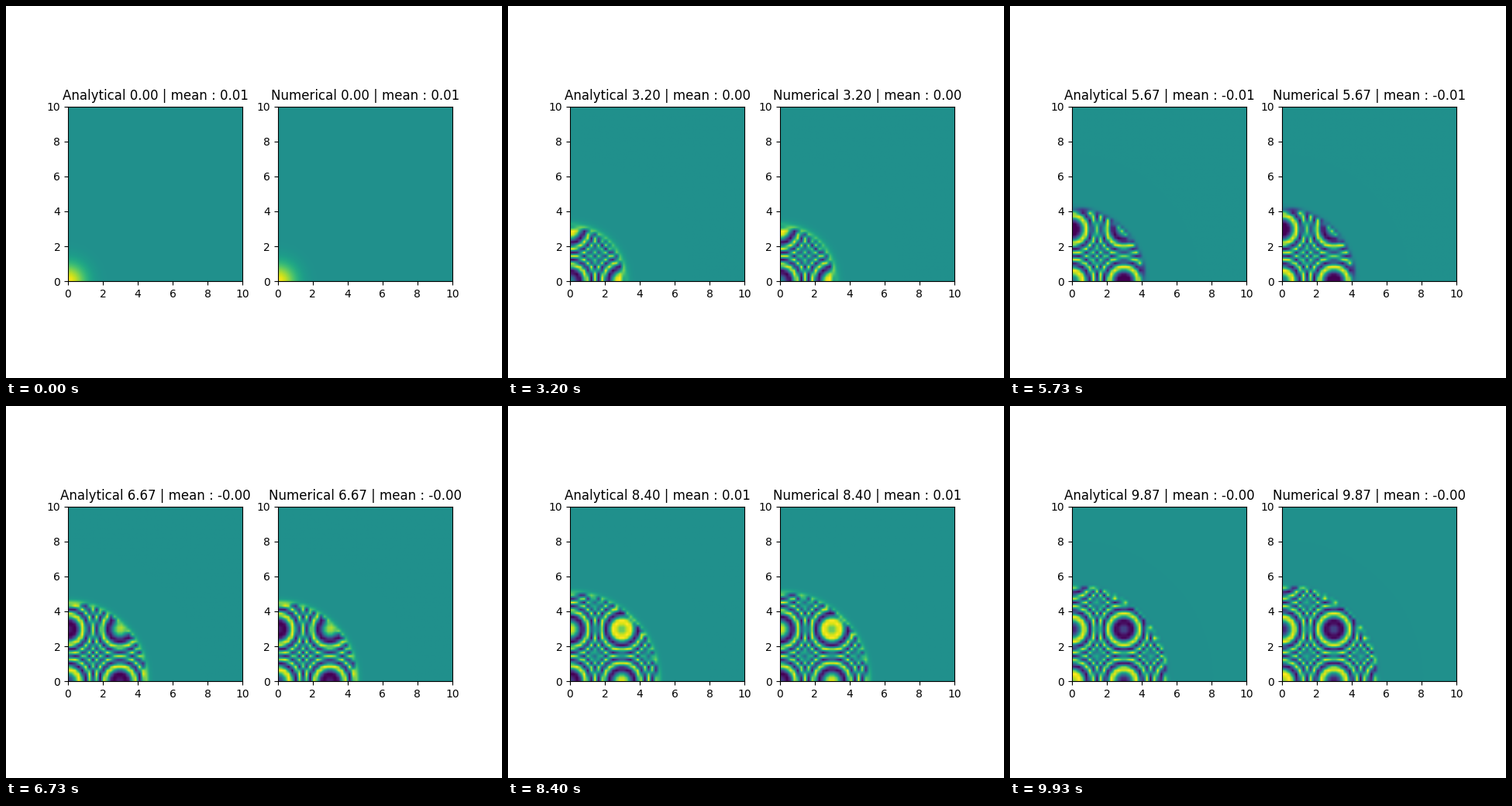
Animation, 640 px wide and 480 px high, one loop 10 s. Source, as a matplotlib script:

```python
import numpy as np
import matplotlib.pyplot as plt
from matplotlib.animation import FuncAnimation

FRAMES = 150
LOOP_MS = 10000
SIZE = 10.0
POINTS = 50

GROWTH = 3.0    # linear growth rate
SHEAR = 5.2     # amplitude dependence of the phase
OMEGA = -3.63   # linear frequency
LIMIT = 1.042   # amplitude of the limit cycle

axis = np.linspace(0, SIZE, POINTS)
step = axis[1] - axis[0]
X, Y = np.meshgrid(axis, axis)
start = np.exp(-(X**2 + Y**2))


def field(t):
    """Oscillator with cubic saturation, solved at every grid point."""
    gain = 1 + (start / LIMIT) ** 2 * np.expm1(2 * GROWTH * t)
    amplitude = start * np.exp(GROWTH * t) / np.sqrt(gain)
    phase = OMEGA * t - SHEAR / 2 * np.log(gain)
    return amplitude * np.cos(phase)


def make_panel(ax):
    # Cell centres sit on the grid points, so the image overlaps the axes.
    lo, hi = -step / 2, SIZE + step / 2
    image = ax.imshow(start, origin="lower", extent=(lo, hi, lo, hi),
                      cmap="viridis", vmin=-1, vmax=1,
                      interpolation="bilinear")
    ax.set_xlim(0, SIZE)
    ax.set_ylim(0, SIZE)
    return image


fig, axes = plt.subplots(1, 2, figsize=(6.4, 4.8), dpi=100)
images = [make_panel(ax) for ax in axes]


def update(frame):
    t = frame * LOOP_MS / FRAMES / 1000
    u = field(t)
    for ax, image, name in zip(axes, images, ("Analytical", "Numerical")):
        image.set_data(u)
        ax.set_title(f"{name} {t:.2f} | mean : {u.mean():.2f}")
    return images


anim = FuncAnimation(fig, update, frames=FRAMES, interval=LOOP_MS / FRAMES,
                     init_func=lambda: update(0), repeat=True, repeat_delay=0)
plt.show()
```
